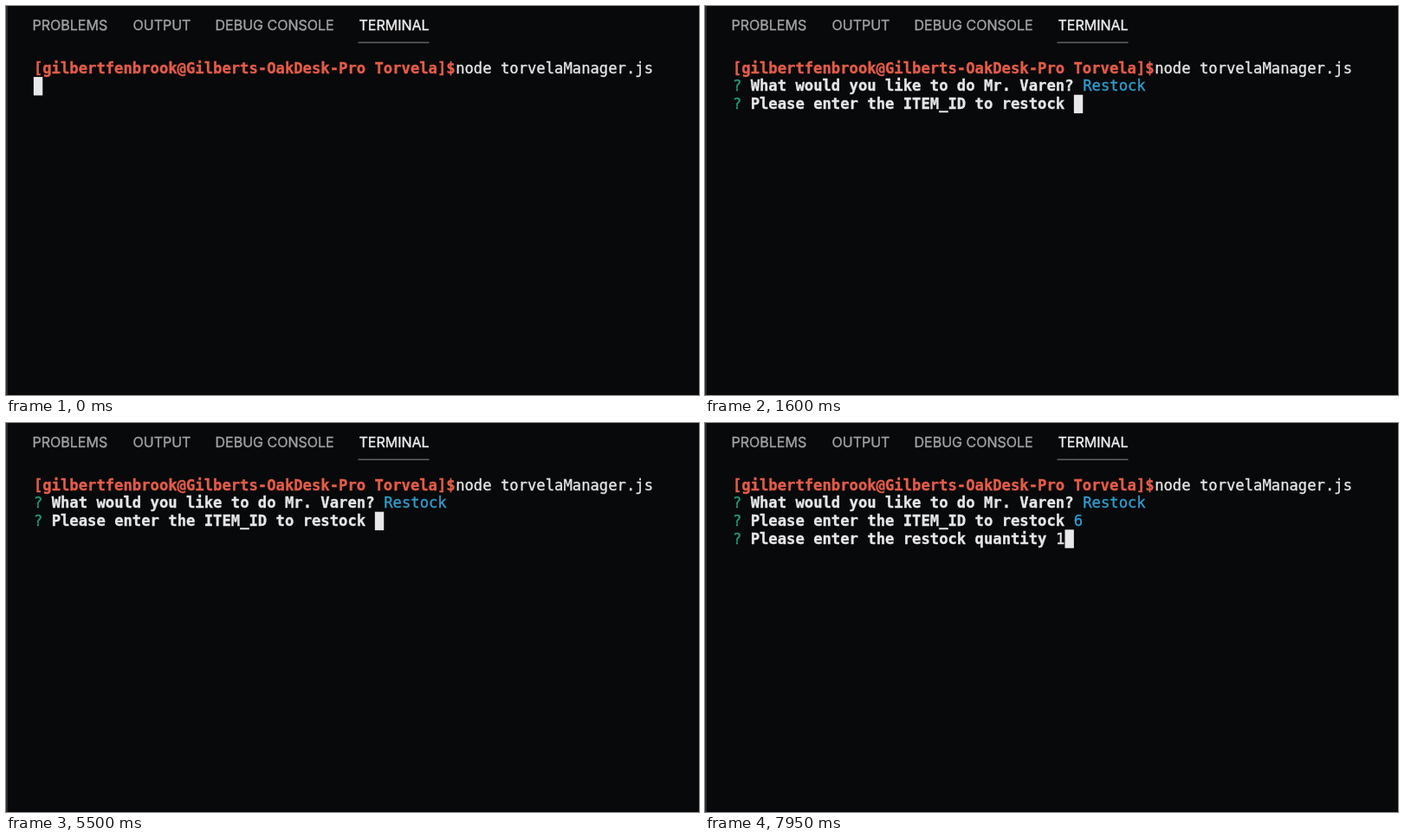
An HTML page that plays this animation: 800x450 px, repeating every 8000 ms.

```html
<!DOCTYPE html>
<html lang="en">
<head>
<meta charset="utf-8">
<title>Terminal session</title>
<style>
  html, body { margin: 0; width: 100%; height: 100%; overflow: hidden; background: #08090b; }
  svg { display: block; width: 100%; height: 100%; }
  text { white-space: pre; fill: currentColor; stroke: currentColor; stroke-width: 0.35; }
  .tab { font: 16px Inter, sans-serif; color: #a3a4a6; }
  .tab.on { color: #f2f2f2; }
  .term { font: 17.22px "DejaVu Sans Mono", monospace; color: #e6e6e7; }
  .bold { font-weight: bold; }
  .red { color: #e55c48; }
  .green { color: #1f9d76; }
  .blue { color: #2f9fd0; }
  .dim { color: #707173; }
  .cursor { fill: #e8e8ea; }
</style>
</head>
<body>
<svg viewBox="0 0 800 450" preserveAspectRatio="none">
  <rect width="800" height="450" fill="#08090b"/>
  <rect width="2" height="450" fill="#2b2c2f"/>
  <text class="tab" x="30.6" y="28.4">PROBLEMS</text>
  <text class="tab" x="146.5" y="28.4">OUTPUT</text>
  <text class="tab" x="241.5" y="28.4">DEBUG CONSOLE</text>
  <text class="tab on" x="407.5" y="28.4">TERMINAL</text>
  <rect x="406.5" y="41.5" width="82" height="1.6" fill="#5d5e61"/>
  <g id="screen"></g>
</svg>
<script>
const LOOP = 8000;
const LEFT = 31.9, CELL = 10.367, TOP = 77.8, LINE = 20.65;

// Moments of the session, in ms
const MENU = 200, DOWN = 750, PICK = 1550, TYPE_ID = 6550, ENTER_ID = 6900, TYPE_QTY = 7800;

const PROMPT = "[gilbertfenbrook@Gilberts-OakDesk-Pro Torvela]$";
const COMMAND = "node torvelaManager.js";
const CHOICES = ["View Products for Sale", "Restock", "View Low Inventory (<50)", "Add New Product"];
const ASK_TASK = "What would you like to do Mr. Varen? ";
const ASK_ID = "Please enter the ITEM_ID to restock ";
const ASK_QTY = "Please enter the restock quantity ";

const screen = document.getElementById("screen");
const escapeText = s => s.replace(/&/g, "&amp;").replace(/</g, "&lt;");
const colX = col => (LEFT + col * CELL).toFixed(2);
const rowY = row => TOP + row * LINE;

const write = (row, col, text, style = "") =>
  `<text class="term ${style}" x="${colX(col)}" y="${rowY(row).toFixed(2)}">${escapeText(text)}</text>`;

const cursor = (row, col) =>
  `<rect class="cursor" x="${colX(col)}" y="${(rowY(row) - 16.4).toFixed(2)}" width="${CELL}" height="21.4"/>`;

const ask = (row, question, answer = "", style = "") =>
  write(row, 0, "?", "green") + write(row, 2, question, "bold") +
  (answer ? write(row, 2 + question.length, answer, style) : "");

function menu(selected) {
  return CHOICES.map((choice, i) => i === selected
    ? write(2 + i, 0, "❯", "blue") + write(2 + i, 2, choice, "blue")
    : write(2 + i, 2, choice)).join("");
}

function input(row, question, typed) {
  return ask(row, question, typed) + cursor(row, 2 + question.length + typed.length);
}

function session(t) {
  if (t < MENU) return cursor(1, 0);
  if (t < DOWN) return ask(1, ASK_TASK, "(Use arrow keys)", "dim") + menu(0);
  if (t < PICK) return ask(1, ASK_TASK) + menu(1);
  const task = ask(1, ASK_TASK, CHOICES[1], "blue");
  if (t < ENTER_ID) return task + input(2, ASK_ID, t < TYPE_ID ? "" : "6");
  return task + ask(2, ASK_ID, "6", "blue") + input(3, ASK_QTY, t < TYPE_QTY ? "" : "1");
}

const shell = write(0, 0, PROMPT, "bold red") + write(0, PROMPT.length, COMMAND);
let shown = "";

function render(t) {
  const next = shell + session(t);
  if (next !== shown) screen.innerHTML = shown = next;
}

const start = performance.now();
function tick() {
  render((performance.now() - start) % LOOP);
  requestAnimationFrame(tick);
}
tick();
</script>
</body>
</html>
```
